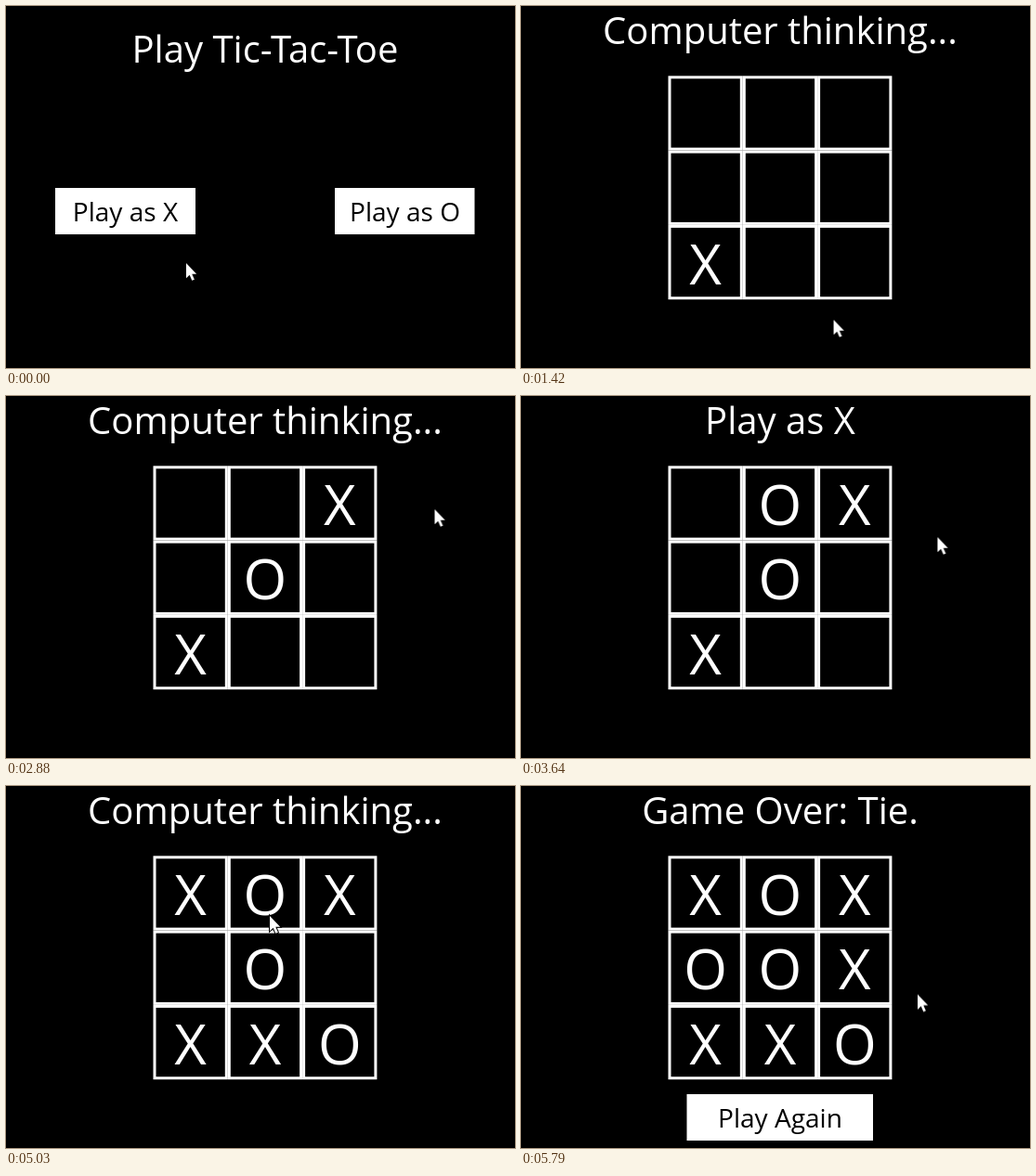
Animation, 548 px wide and 390 px high, one loop 6.27 s. Source, as an HTML page:

```html
<!DOCTYPE html>
<html lang="en">
<head>
<meta charset="utf-8">
<title>Tic-Tac-Toe</title>
<style>
html, body { margin: 0; width: 100%; height: 100%; overflow: hidden; background: #000; }
svg { display: block; width: 548px; height: 390px; }
text { font-family: "Open Sans", "Noto Sans", sans-serif; text-anchor: middle; fill: #fff; }
.title { font-size: 40px; }
.label { font-size: 28px; fill: #000; }
.mark { font-size: 60px; }
.button { fill: #fff; }
.grid rect { fill: none; stroke: #fff; stroke-width: 3; }

/* hard switches, one shared clock */
.menu, .game, .play, .think, .over, .mark { animation: 6270ms step-end infinite; }
.menu { animation-name: menu; }
.game { animation-name: game; }
.play { animation-name: play; }
.think { animation-name: think; }
.over { animation-name: over; }
.t1 { animation-name: t1; }
.t2 { animation-name: t2; }
.t3 { animation-name: t3; }
.t4 { animation-name: t4; }
.t5 { animation-name: t5; }
.t6 { animation-name: t6; }
.t7 { animation-name: t7; }
.t8 { animation-name: t8; }
@keyframes menu { 0% { opacity: 1 } 8.77%, to { opacity: 0 } }
@keyframes game { 0% { opacity: 0 } 8.77%, to { opacity: 1 } }
@keyframes play {
  0%, 15.94%, 41.62%, 59.01%, 73.36%, 89.95%, to { opacity: 0 }
  8.77%, 39.07%, 49.6%, 66.66%, 81.17% { opacity: 1 }
}
@keyframes think {
  0%, 39.07%, 49.6%, 66.66%, 81.17%, to { opacity: 0 }
  15.94%, 41.62%, 59.01%, 73.36% { opacity: 1 }
}
@keyframes over { 0% { opacity: 0 } 89.95%, to { opacity: 1 } }
@keyframes t1 { 0% { opacity: 0 } 15.94%, to { opacity: 1 } }
@keyframes t2 { 0% { opacity: 0 } 39.07%, to { opacity: 1 } }
@keyframes t3 { 0% { opacity: 0 } 41.62%, to { opacity: 1 } }
@keyframes t4 { 0% { opacity: 0 } 49.6%, to { opacity: 1 } }
@keyframes t5 { 0% { opacity: 0 } 59.01%, to { opacity: 1 } }
@keyframes t6 { 0% { opacity: 0 } 66.66%, to { opacity: 1 } }
@keyframes t7 { 0% { opacity: 0 } 73.36%, to { opacity: 1 } }
@keyframes t8 { 0% { opacity: 0 } 81.17%, to { opacity: 1 } }

.cursor { fill: #fff; stroke: #000; stroke-width: 2; paint-order: stroke; animation: cursor 6270ms linear infinite; }
@keyframes cursor {
  0% { transform: translate(194px, 277px) }
  1.43%, 4.7% { transform: translate(187px, 276px) }
  4.78%, 12.1% { transform: translate(186px, 275px); animation-timing-function: ease-in }
  15.9% { transform: translate(245px, 338px) }
  18.8% { transform: translate(298px, 374px) }
  22.64% { transform: translate(336.5px, 338px); animation-timing-function: ease-in-out }
  27% { transform: translate(537px, 20px); animation-timing-function: ease-in-out }
  30.94%, 56.6% { transform: translate(461.5px, 122px); animation-timing-function: ease-in-out }
  62.84%, 66.67% { transform: translate(347px, 384px); animation-timing-function: ease-in-out }
  73.3%, 84.2% { transform: translate(284px, 140px); animation-timing-function: ease-in-out }
  90.5%, to { transform: translate(427px, 224.5px) }
}
</style>
</head>
<body>
<svg viewBox="0 0 548 390">
  <g class="menu">
    <text class="title" x="279" y="61">Play Tic-Tac-Toe</text>
    <rect class="button" x="53" y="196" width="151" height="50"/>
    <rect class="button" x="354" y="196" width="150.5" height="50"/>
    <text class="label" x="128.5" y="232">Play as X</text>
    <text class="label" x="429.5" y="232">Play as O</text>
  </g>
  <g class="game">
    <text class="title play" x="279" y="41">Play as X</text>
    <text class="title think" x="279" y="41">Computer thinking...</text>
    <g class="grid" id="grid"></g>
    <g id="marks"></g>
    <g class="over">
      <text class="title" x="279" y="41">Game Over: Tie.</text>
      <rect class="button" x="178.5" y="332" width="200.5" height="50"/>
      <text class="label" x="279" y="368">Play Again</text>
    </g>
  </g>
  <path class="cursor" d="M0 0V16.2L3.7 12.8L6.3 18.8L8.9 17.7L6.3 11.8H11.2Z"/>
</svg>
<script>
const size = 80.3, left = 158.5, top0 = 75.3;
// turn and symbol of each cell, row by row
const cells = ["7X", "4O", "3X", "8O", "2O", "9X", "1X", "5X", "6O"];

function add(parent, name, attrs, text = "") {
  const el = document.createElementNS("http://www.w3.org/2000/svg", name);
  for (const key in attrs) el.setAttribute(key, attrs[key]);
  el.textContent = text;
  document.getElementById(parent).append(el);
}

cells.forEach(([turn, symbol], i) => {
  const x = left + (i % 3) * size, y = top0 + Math.floor(i / 3) * size;
  add("grid", "rect", { x: x + 1.5, y: y + 1.5, width: size - 3, height: size - 3 });
  const cls = turn === "9" ? "mark over" : "mark t" + turn;
  add("marks", "text", { class: cls, x: x + size / 2, y: y + size / 2 + 23.5 }, symbol);
});
</script>
</body>
</html>
```
